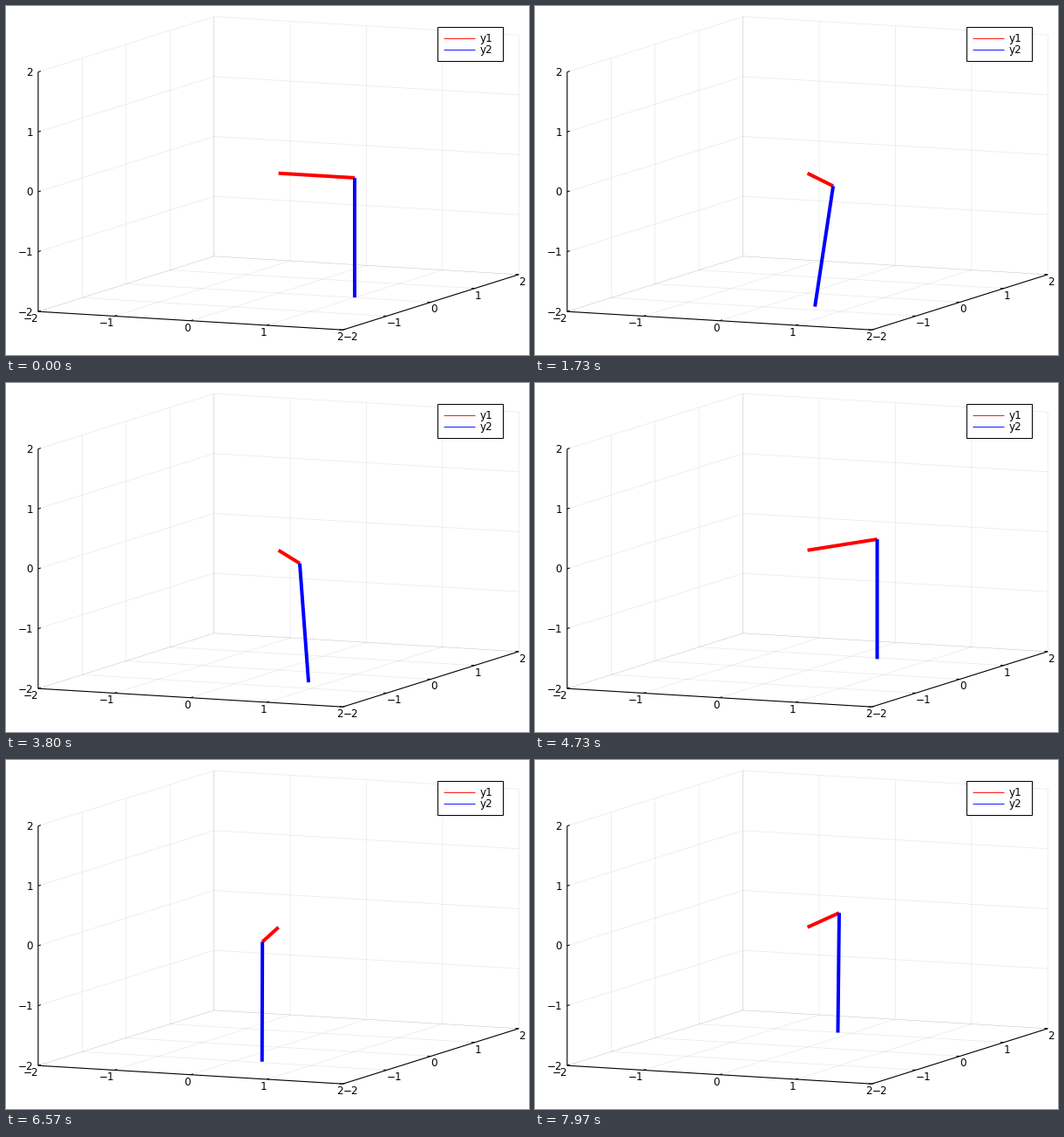
A matplotlib script for the animation above (8 s loop, 600x400 px).

```python
import numpy as np
import matplotlib.pyplot as plt
from matplotlib.animation import FuncAnimation
from matplotlib.patches import Rectangle

W, H, DPI = 600, 400, 100
LOOP, TICK = 8000, 20   # ms
FPS = 30                # pace of the simulated motion
PX = 72 / DPI           # points per pixel

plt.rcParams["font.family"] = "DejaVu Sans"
fig = plt.figure(figsize=(W / DPI, H / DPI), dpi=DPI, facecolor="white")
ax = fig.add_axes([0, 0, 1, 1])
ax.set_xlim(0, W)
ax.set_ylim(H, 0)
ax.axis("off")

# Orthographic view: screen position of the centre and of each unit axis
CENTER = np.array([312.6, 191.7])
AXES = np.array([[87.4, 5.25], [50.45, -15.85], [0, -68.65]])


def project(p):
    return CENTER + np.asarray(p, float) @ AXES


def line(points, color, width, **kw):
    xs, ys = np.transpose(points)
    kw.setdefault("solid_capstyle", "butt")
    return ax.plot(xs, ys, color=color, lw=width * PX, **kw)[0]


def line3d(a, b, color, width, **kw):
    return line([project(a), project(b)], color, width, **kw)


def label(x, y, text, ha):
    ax.text(x, y + 4.4, text, fontsize=12 * PX, ha=ha, va="baseline", zorder=7)


def draw_grid():
    for v in range(-2, 3):
        for a, b in [
            ((v, -2, -2), (v, 2, -2)), ((-2, v, -2), (2, v, -2)),  # floor
            ((v, 2, -2), (v, 2, 2)), ((-2, 2, v), (2, 2, v)),      # back wall
            ((-2, v, -2), (-2, v, 2)), ((-2, -2, v), (-2, 2, v)),  # left wall
        ]:
            line3d(a, b, (0, 0, 0, 0.1), 0.6, snap=False)


def draw_axes():
    corners = [(-2, -2, 2), (-2, -2, -2), (2, -2, -2), (2, 2, -2)]
    line([project(c) for c in corners], "black", 1.1, solid_joinstyle="miter")
    for v in range(-2, 3):
        text = str(v).replace("-", "\u2212")
        on_x, on_y, on_z = (v, -2, -2), (2, v, -2), (-2, -2, v)
        line3d(on_x, (v, -1.94, -2), "black", 1)
        line3d(on_y, (1.955, v, -2), "black", 1)
        line3d(on_z, (-2, -1.94, v), "black", 1)
        label(*(project(on_x) + [0.4, 7.6]), text, "right")
        label(*(project(on_y) + [0, 7.5]), text, "left")
        label(*(project(on_z) + [-6, 0]), text, "right")


def draw_legend():
    ax.add_patch(Rectangle((495, 23.5), 74.5, 39, fc="white", ec="black",
                           lw=PX, zorder=5))
    for y, color, name in [(37, "red", "y1"), (49.5, "blue", "y2")]:
        line([(501.5, y), (538, y)], color, 0.9, zorder=6)
        label(544, y, name, "left")


def heading(t):
    """Arm angle in degrees: steady turn plus one surge, eased in from rest."""
    surge = 224.6 / (1 + np.exp(-2.73 * (t - 1.703)))
    return 121 * t + surge - 9.7 + 7.6 * np.exp(-t / 0.06)


def swing(t):
    """Pendulum angle in radians: a slow oscillation that builds and dies."""
    envelope = 0.236 * np.exp(-0.4 * t) * (1 - np.exp(-t * t))
    return -envelope * np.sin(1.65 * (t - 0.93))


def pose(t):
    turn, tilt = np.radians(heading(t)), swing(t)
    c, s = np.cos(turn), np.sin(turn)
    joint = np.array([c, s, 0])
    bob = joint + 2 * np.array([-s * np.sin(tilt), c * np.sin(tilt), -np.cos(tilt)])
    return project(joint), project(bob)


draw_grid()
draw_axes()
draw_legend()
arm = line3d((0, 0, 0), (1, 0, 0), "red", 4, zorder=3)
rod = line3d((1, 0, 0), (1, 0, -2), "blue", 4, zorder=4)


def update(i):
    # Hold each pose for a whole step, read near the middle of the tick
    ms = (i + 0.5) * TICK + 3.4
    joint, bob = pose(int(ms * FPS / 1000) / FPS)
    arm.set_data(*np.transpose([CENTER, joint]))
    rod.set_data(*np.transpose([joint, bob]))
    return arm, rod


anim = FuncAnimation(fig, update, frames=LOOP // TICK, interval=TICK,
                     repeat=True, repeat_delay=0)
plt.show()
```
